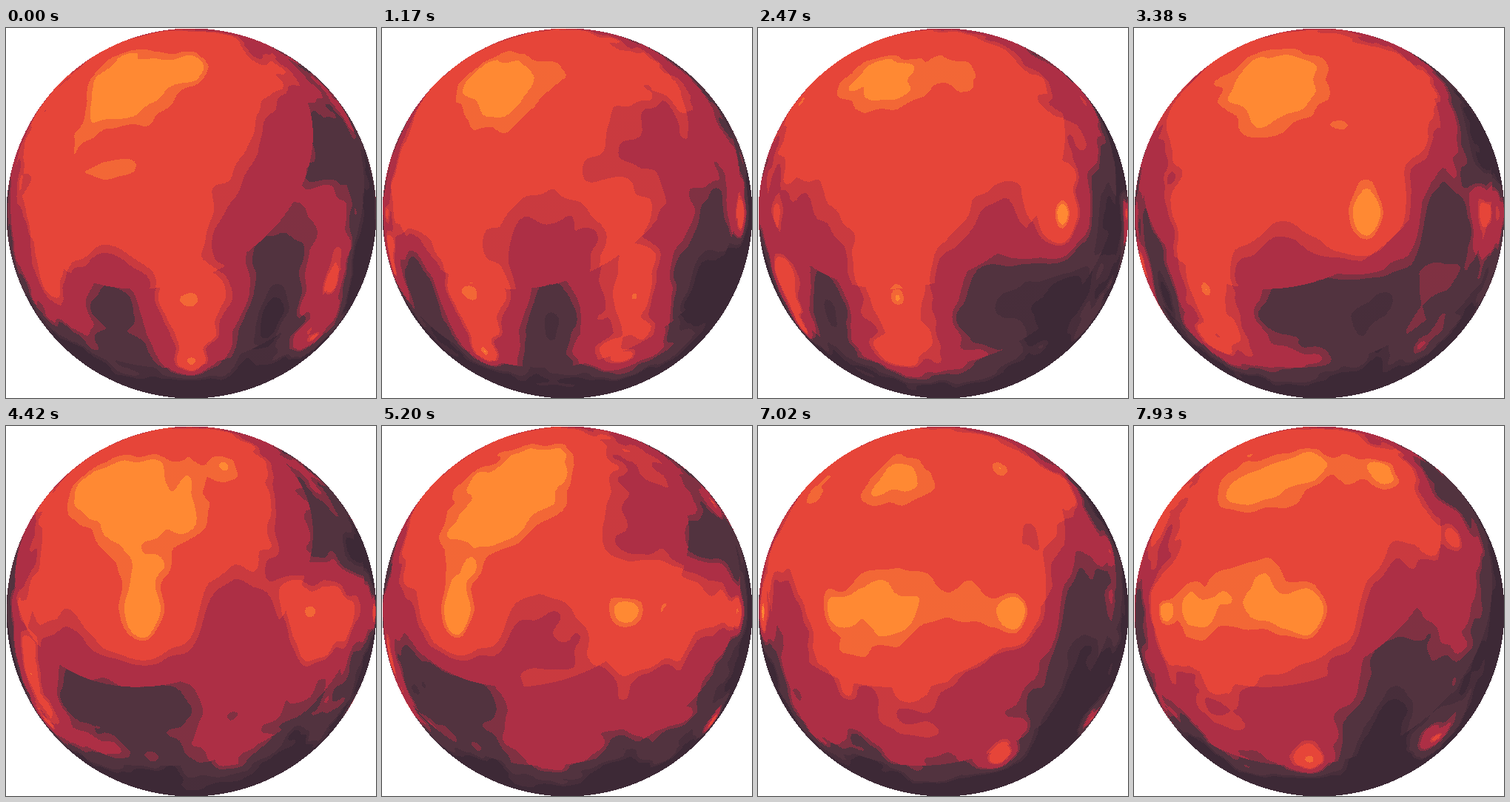
An HTML page with a canvas that plays this animation: 500x500 px, repeating every 8 s.

```html
<!DOCTYPE html>
<html>
<head>
<meta charset="utf-8">
<style>
  html, body { margin: 0; width: 100%; height: 100%; overflow: hidden; background: #fff; }
  canvas { display: block; }
</style>
</head>
<body>
<canvas id="planet" width="500" height="500"></canvas>
<script>
const SIZE = 500, CELLS = 8, LOOP = 8000, STEP = 130;
const TURN = 2 / 15; // cells the surface moves per step
const COLORS = [0xff3389ff, 0xff3945e6, 0xff452fad, 0xff3f3352, 0xff36293d]; // ABGR, bright to dark

// Broad relief on a 16 x 8 lattice: a plain with hills, dips and hollows, as row: columns
const PLAIN = 0.45;
const relief = [
  [0.62, { 2: [2, 10, 14], 3: [5, 6, 10, 11], 4: [5, 9, 13], 5: [3, 5, 7, 8, 13], 6: [13] }],
  [0.32, { 2: [3, 4, 7, 9, 12], 3: [8, 14], 4: [2, 3, 6, 14], 5: [10, 11], 6: [7, 9, 11] }],
  [0.19, { 2: [13], 4: [8, 10, 11, 12], 5: [2, 4, 6], 6: [4, 6, 12, 14] }],
];
const land = new Float32Array(128).fill(PLAIN);
for (const [level, rows] of relief)
  for (const row in rows)
    for (const column of rows[row]) land[row * 16 + column] = level;

// Seeded roughness around zero
const rough = Float32Array.from({ length: 128 }, (_, i) => {
  const r = Math.sin((i & 15) * 12.9898 + (i >> 4) * 78.233) * 69.8;
  return r - Math.floor(r) - 0.5;
});

// Smooth interpolation of a lattice that tiles in both directions
function sample(grid, x, y) {
  const i = Math.floor(x), j = Math.floor(y);
  const fx = x - i, fy = y - j;
  const sx = fx * fx * (3 - 2 * fx), sy = fy * fy * (3 - 2 * fy);
  const left = i & 15, right = (i + 1) & 15;
  const top = (j & 7) << 4, low = ((j + 1) & 7) << 4;
  const a = grid[top + left], b = grid[top + right];
  const c = grid[low + left], d = grid[low + right];
  const upper = a + (b - a) * sx;
  return upper + (c + (d - c) * sx - upper) * sy;
}

const height = (x, y) => Math.max(0,
  sample(land, x, y) + 0.12 * sample(rough, 2 * x, 2 * y) + 0.1 * sample(rough, 4 * x, 4 * y));

// Sphere position (in lattice cells) and shading at a pixel
function surface(px, py) {
  const x = px / SIZE * 2 - 1, y = py / SIZE * 2 - 1;
  const z = 1 + Math.sqrt(1 - x * x - y * y);
  const u = x / z / 2 + 0.5, v = y / z / 2 + 0.5;
  const t = (Math.hypot(u - 0.4, v - 0.3) + 0.3) / 1.5;
  let light = t * t * (3 - 2 * t);
  if (light < 0.362) light *= 0.9;
  if (light < 0.525) light *= 0.9;
  return { u: u * CELLS, v: v * CELLS, light: light * 3.5 };
}

const ctx = document.getElementById('planet').getContext('2d');
const image = ctx.createImageData(SIZE, SIZE);
const pixels = new Uint32Array(image.data.buffer);
const disc = [];
for (let y = 0; y < SIZE; y++) {
  for (let x = 0; x < SIZE; x++) {
    if (Math.hypot(x - 250, y - 250) > 249.995) continue;
    disc.push({ ...surface(x, y), at: y * SIZE + x, checker: (x + y) % 2 === 0 });
  }
}

function draw(step) {
  for (const p of disc) {
    let c = p.light * height(p.u + step * TURN, p.v) ** 0.8;
    if (p.checker) c = (c + 0.02) * 1.05;
    pixels[p.at] = COLORS[Math.min(4, Math.floor(c * 4))];
  }
  ctx.putImageData(image, 0, 0);
}

let shown = -1;
function tick() {
  const step = Math.floor(performance.now() % LOOP / STEP);
  if (step !== shown) draw(shown = step);
  requestAnimationFrame(tick);
}
tick();
</script>
</body>
</html>
```
